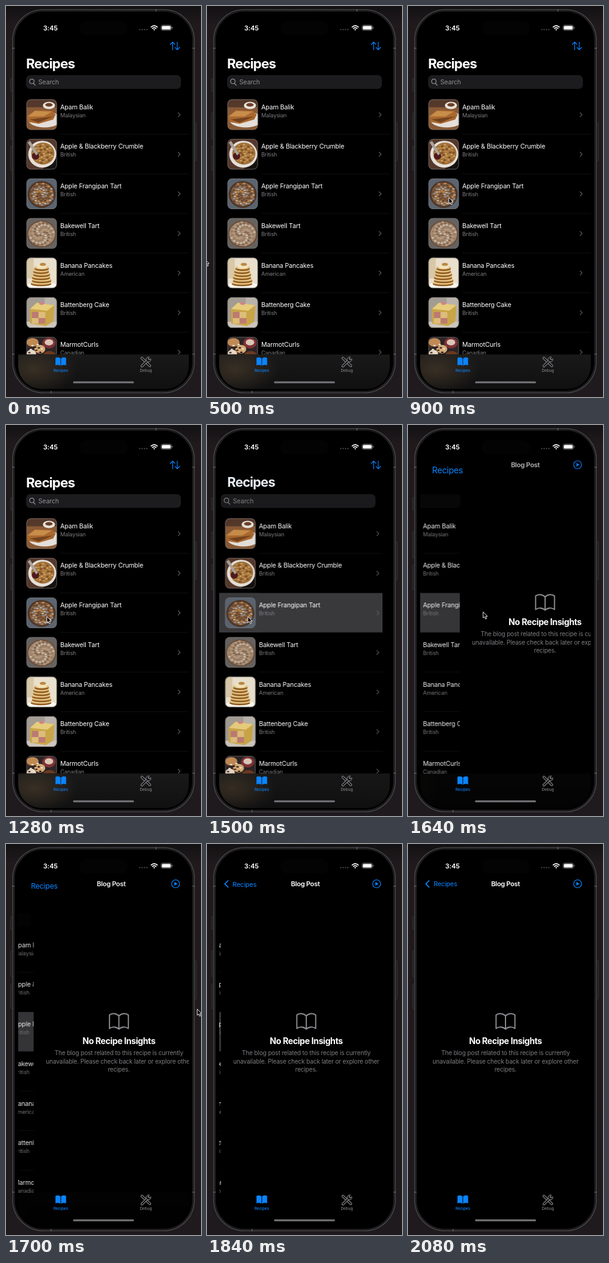
Recreate the animation shown at these times as an HTML page. Size 320x639 px, loop 3090 ms.

```html
<!DOCTYPE html>
<html lang="en">
<head>
<meta charset="utf-8">
<title>Recipes</title>
<style>
  html, body { margin: 0; height: 100%; overflow: hidden; background: #1c181b; }
  svg { display: block; width: 100vw; height: 100vh; }
  text { font-family: Inter, "Liberation Sans", sans-serif; letter-spacing: -.015em; fill: #fff; }
  .grey { fill: #7d7d82; }
  .blue { fill: #0a84ff; }
  .line { fill: none; stroke-linecap: round; stroke-linejoin: round; }
  .mid { text-anchor: middle; }
</style>
</head>
<body>
<svg viewBox="0 0 320 639" preserveAspectRatio="none">
  <defs>
    <linearGradient id="back" x2="0" y2="1">
      <stop offset="0" stop-color="#131113"/><stop offset=".05" stop-color="#201a1d"/>
      <stop offset="1" stop-color="#1f1a1d"/>
    </linearGradient>
    <linearGradient id="glass" x2="0" y2="1">
      <stop offset="0" stop-color="#19191a"/><stop offset="1" stop-color="#101011"/>
    </linearGradient>
    <radialGradient id="warm">
      <stop offset="0" stop-color="#5c4a32" stop-opacity=".5"/><stop offset="1" stop-color="#5c4a32" stop-opacity="0"/>
    </radialGradient>
    <clipPath id="screen"><rect x="20" y="14" width="280" height="612" rx="38"/></clipPath>
    <clipPath id="listClip"><rect id="listBox" x="20" y="140" width="280" height="429.5"/></clipPath>
    <clipPath id="thumb"><rect width="50" height="50" rx="7.5"/></clipPath>
  </defs>

  <rect width="320" height="639" fill="url(#back)"/>
  <g fill="#1d1b1d" stroke="#454246" stroke-width=".8">
    <rect x="8" y="119" width="5" height="20" rx="1"/>
    <rect x="8" y="175" width="5" height="42" rx="1"/>
    <rect x="8" y="229" width="5" height="40" rx="1"/>
    <rect x="307" y="191" width="5" height="62" rx="1"/>
  </g>
  <rect x="11" y="6" width="298" height="626" rx="50" fill="#111" stroke="#454447" stroke-width="1.6"/>
  <rect x="13.5" y="8.5" width="293" height="621" rx="47.5" fill="#000" stroke="#29282a" stroke-width="1.2"/>
  <path d="M10 69h4M306 69h4M10 569h4M306 569h4M246 5v4M74 629v4" stroke="#6a686b" stroke-width="2" opacity=".6"/>

  <g clip-path="url(#screen)">
    <rect x="20" y="14" width="280" height="612"/>
    <g clip-path="url(#listClip)"><g id="list"></g></g>

    <g id="search">
      <rect x="33" y="113" width="254" height="22.5" rx="6.5" fill="#1c1c1e"/>
      <g id="hint">
        <path class="line" d="M45 126.500L48 129.500M46.200 123.200a3.800 3.800 0 1 1-7.600 0a3.800 3.800 0 1 1 7.600 0" stroke="#8e8e93" stroke-width="1.200"/>
        <text x="53" y="128.300" font-size="10.500" style="fill:#8e8e93">Search</text>
      </g>
    </g>

    <g id="page">
      <path class="line" d="M160 281C156 276.500 148 276 144.500 279.500V301.500C149 298 156 298.500 160 302.500C164 298.500 171 298 175.500 301.500V279.500C172 276 164 276.500 160 281V302" stroke="#8e8e93" stroke-width="1.900"/>
      <text class="mid" x="160" y="327" font-size="14" font-weight="700" style="letter-spacing:-.03em">No Recipe Insights</text>
      <g class="mid" font-size="9.93">
        <text class="grey" x="160" y="345.300">The blog post related to this recipe is currently</text>
        <text class="grey" x="160" y="358.500">unavailable. Please check back later or explore other</text>
        <text class="grey" x="160" y="371.700">recipes.</text>
      </g>
    </g>

    <g id="bar">
      <rect x="20" y="569.500" width="280" height="57" fill="url(#glass)"/>
      <ellipse id="glow" cx="46" cy="594" rx="72" ry="42" fill="url(#warm)" clip-path="url(#barClip)"/>
      <clipPath id="barClip"><rect x="-80" y="569.500" width="400" height="57"/></clipPath>
    </g>

    <g id="title">
      <text id="big" y="7.700" font-size="22.100" font-weight="700" style="letter-spacing:-.04em">Recipes</text>
      <g transform="scale(2.100)"><text id="small" class="blue" y="3.900" font-size="10.700" style="letter-spacing:-.02em">Recipes</text></g>
    </g>
    <path id="arrow" class="line" d="M34.500 60L29.300 65.200L34.500 70.400" stroke="#0a84ff" stroke-width="1.700"/>
    <text id="post" class="mid" y="69" font-size="11" font-weight="600" style="letter-spacing:-.03em">Blog Post</text>
    <path id="sort" class="line" d="M273.500 71.500V59M269.500 63L273.500 59L277.200 62.700M281 59V71.500M277.300 67.700L281 71.500L284.900 67.500" stroke="#0a84ff" stroke-width="1.150"/>
    <g id="play">
      <circle cx="278.300" cy="65" r="6.500" fill="none" stroke="#0a84ff" stroke-width="1.200"/>
      <path class="blue" d="M276.300 61.900L281.600 65L276.300 68.100Z"/>
    </g>
  </g>

  <rect x="120" y="25" width="80" height="23" rx="11.500" fill="#030303"/>
  <text x="61" y="39.800" font-size="11" font-weight="600">3:45</text>
  <path class="line" d="M219.500 38.500h12.500" stroke="#55555a" stroke-width="2.200" stroke-dasharray="0 3.900"/>
  <g class="line" stroke="#fff" stroke-width="1.700">
    <path d="M238.200 34.300Q243.200 29.800 248.200 34.300M240.300 36.600Q243.200 34 246.100 36.600"/>
    <path d="M243.200 38.700v.1" stroke-width="2.200"/>
  </g>
  <rect x="254.500" y="31.200" width="17" height="8.600" rx="2.700" fill="none" stroke="#88888c" stroke-width=".8"/>
  <rect x="255.700" y="32.400" width="14.600" height="6.200" rx="1.700" fill="#fff"/>
  <path d="M273 34.200v2.600" stroke="#88888c" stroke-width="1.100"/>

  <path class="blue" d="M89.400 576C87.500 573.800 83.500 573.700 81.200 575V587.300C83.800 586 87.300 586.200 89.400 588ZM90.400 576C92.300 573.800 96.300 573.700 98.600 575V587.300C96 586 92.500 586.200 90.400 588Z"/>
  <text class="blue mid" x="90" y="597.600" font-size="6.300" font-weight="500" style="letter-spacing:0">Recipes</text>
  <g class="line">
    <path d="M223 575.500L236 588" stroke="#8e8e93" stroke-width="4.200"/>
    <path d="M223 575.500L236 588" stroke="#111" stroke-width="2.200"/>
    <path d="M223 588.500L233.500 578" stroke="#8e8e93" stroke-width="4.200"/>
    <path d="M223 588.500L233.500 578" stroke="#111" stroke-width="2.200"/>
    <path d="M235 573.700A4 4 0 1 0 237.700 576.600L234.800 578.400L233 576.600Z" fill="#111" stroke="#8e8e93"/>
  </g>
  <text class="grey mid" x="229.500" y="597.600" font-size="6.300" font-weight="500" style="letter-spacing:0">Debug</text>
  <rect x="110" y="613.500" width="100" height="3" rx="1.500" fill="#77777a"/>

  <path id="cursor" d="M0 0V10L2.400 8L4 11.700L5.800 10.900L4.200 7.400H7.200Z" fill="#000" stroke="#fff" stroke-width=".9" stroke-linejoin="round"/>
</svg>

<script>
const LOOP = 3090, PITCH = 64.7;
const $ = id => document.getElementById(id);
const clamp = v => Math.max(0, Math.min(1, v));

// Thumbnail shapes on a 50 by 50 tile
const box = (x, y, w, h, c) => `<rect x="${x}" y="${y}" width="${w}" height="${h}" fill="${c}"/>`;
const oval = (x, y, rx, ry, c) => `<ellipse cx="${x}" cy="${y}" rx="${rx}" ry="${ry}" fill="${c}"/>`;
const shape = (d, c) => `<path d="${d}" fill="${c}"/>`;

function specks(n, cx, cy, r, colors) {
  let out = '';
  for (let i = 0; i < n; i++) {
    const a = i * 2.4, d = r * Math.sqrt((i + .5) / n);
    out += oval(cx + d * Math.cos(a), cy + d * Math.sin(a), 2.1, 1.2, colors[i % colors.length]);
  }
  return out;
}

function pancakes() {
  let out = box(0, 0, 50, 50, '#e9dfcd') + box(0, 0, 12, 34, '#d8c8a8') + oval(25, 45, 24, 5, '#fbf8f2');
  for (let i = 0; i < 6; i++)
    out += oval(24 + i % 2, 43 - i * 5, 17 - i, 3.8, '#8f5a1e') + oval(24 + i % 2, 41 - i * 5, 17 - i, 3.2, '#e3c283');
  return out + oval(25, 14, 9, 4, '#f3e3bc') + oval(27, 11, 5, 2.5, '#b98a45');
}

const meals = [
  ['Apam Balik', 'Malaysian', box(0, 0, 50, 50, '#8a5a36') + box(0, 0, 50, 13, '#54382a') +
    oval(37, 10, 10, 6, '#e8e2da') + oval(37, 9, 6, 3, '#6b4028') + oval(30, 33, 27, 13, '#e4dfda') +
    shape('M1 28L14 18L42 19L48 25L44 33L20 40L3 37Z', '#a9682f') + shape('M2 28L14 19L42 20L28 28Z', '#c98d4a') +
    shape('M5 33L44 28L20 38Z', '#74431f')],
  ['Apple & Blackberry Crumble', 'British', box(0, 0, 50, 50, '#56382c') + shape('M50 26V50H26Z', '#15110f') +
    oval(26, 25, 23, 22, '#e5dfd8') + oval(27, 24, 19, 18, '#a07038') +
    specks(44, 27, 24, 16, ['#cfa463', '#7a4a28', '#b98a4b']) +
    oval(15, 28, 6, 6, '#4f1a1c') + shape('M2 6L6 3L19 24L16 27Z', '#a9a39c')],
  ['Apple Frangipan Tart', 'British', box(0, 0, 50, 50, '#5b6470') + oval(25, 26, 23, 22, '#4e3629') +
    oval(25, 26, 20, 19, '#85603f') + specks(64, 25, 26, 19, ['#b9b4b2', '#6b432a', '#c98d4c', '#8f8f96', '#5a4338'])],
  ['Bakewell Tart', 'British', box(0, 0, 50, 50, '#66625f') + oval(25, 26, 24, 22, '#6a4c38') +
    oval(25, 26, 22, 20, '#a48a72') + specks(72, 25, 26, 20, ['#cdbfb0', '#7d5f48', '#b89c80', '#977a60'])],
  ['Banana Pancakes', 'American', pancakes()],
  ['Battenberg Cake', 'British', box(0, 0, 50, 50, '#a39c94') + box(30, 0, 20, 50, '#b9b3ac') +
    box(0, 40, 50, 10, '#cdc6bd') +
    shape('M6 19L17 9L46 13L44 40L32 47L6 43Z', '#c9a548') + shape('M6 19L17 9L46 13L34 22Z', '#e6cc7c') +
    box(9, 24, 11, 10, '#bd7a72') + box(20, 24, 11, 10, '#dcbd7a') + box(9, 34, 11, 9, '#dcbd7a') +
    box(20, 34, 11, 9, '#bd7a72') + oval(25, 10, 4, 2.5, '#cf8488')],
  ['MarmotCurls', 'Canadian', box(0, 0, 50, 50, '#2c2426') + oval(10, 9, 10, 7, '#c08a55') +
    oval(37, 10, 11, 9, '#7d3236') + oval(37, 9, 7, 5, '#dcc6b8') + oval(22, 20, 9, 7, '#d4ab78') +
    oval(8, 28, 8, 7, '#e2d6c6') + oval(38, 32, 11, 9, '#6a3a20') +
    specks(14, 14, 22, 12, ['#5a2d1c', '#efe0c8', '#2a1a16'])]
];

$('list').innerHTML = `<rect id="press" x="20" y="${209.7 + PITCH}" width="340" height="${PITCH}" fill="#3a3a3c"/>` +
  meals.map(([name, origin, art], i) => `<g transform="translate(0 ${i * PITCH})">
    <g transform="translate(33.500 152.500)"><g clip-path="url(#thumb)">${art}</g>
      <rect x=".5" y=".5" width="49" height="49" rx="7" fill="none" stroke="#7a7877" stroke-opacity=".7"/></g>
    <text x="89" y="168.800" font-size="10.500">${name.replace('&', '&amp;')}</text>
    <text class="grey" x="89" y="181.800" font-size="9.080">${origin}</text>
    <path class="line" d="M282.500 174.300L285.800 177.600L282.500 180.900" stroke="#5c5c60" stroke-width="1.200"/>
    <path d="M89 209.700H380" stroke="#151517" stroke-width=".8"/></g>`).join('');

// Tables of [time, value, ...]
const pointer = [[480, -14, 425], [500, -4, 414], [600, 35, 365], [720, 58, 330], [900, 67, 313],
  [1595, 67, 313], [1640, 120, 306], [1700, 313, 270], [1740, 345, 262]];
const phase = [[1484, 0], [1500, .32], [1580, 1.55], [1700, 4], [2080, 11]];

function at(table, t, col = 1) {
  const k = table.findIndex(row => row[0] > t);
  if (k === 0) return table[0][col];
  if (k < 0) return table[table.length - 1][col];
  const a = table[k - 1], b = table[k];
  return a[col] + (b[col] - a[col]) * (t - a[0]) / (b[0] - a[0]);
}

// Critically damped spring
const spring = w => {
  const v = 1 - (1 + w) * Math.exp(-w);
  return v > .999 ? 1 : v;
};

const move = (id, x, y = 0, s = 1) => $(id).setAttribute('transform', `translate(${x} ${y}) scale(${s})`);
const fade = (id, v) => $(id).setAttribute('opacity', clamp(v));

function draw(t) {
  const w = at(phase, t), p = spring(w), q = spring(w * .9);

  $('listBox').setAttribute('width', 280 * (1 - p));
  move('list', -84 * p);
  fade('list', 1 - .1 * p);
  fade('press', t >= 1400 ? 1 : 0);
  move('page', 280 * (1 - p));

  move('search', -280 * q);
  fade('search', 1 - q);
  fade('hint', 1 - 2.5 * q);
  fade('bar', 1 - p);
  move('glow', -84 * p);

  move('title', 33 + 9 * q, 94.5 - 29.5 * q, 1 - .524 * q);
  fade('big', 1 - 1.5 * q);
  fade('small', 1.6 * q);
  fade('arrow', (p - .93) / .06);
  $('post').setAttribute('x', 160 + 140 * (1 - p));
  fade('post', (p - .36) / .58);
  fade('sort', 1 - 1.2 * q);
  fade('play', 1.25 * q);

  move('cursor', at(pointer, t), at(pointer, t, 2));
}

const start = performance.now();
function tick() {
  draw((performance.now() - start) % LOOP);
  requestAnimationFrame(tick);
}
tick();
</script>
</body>
</html>
```
